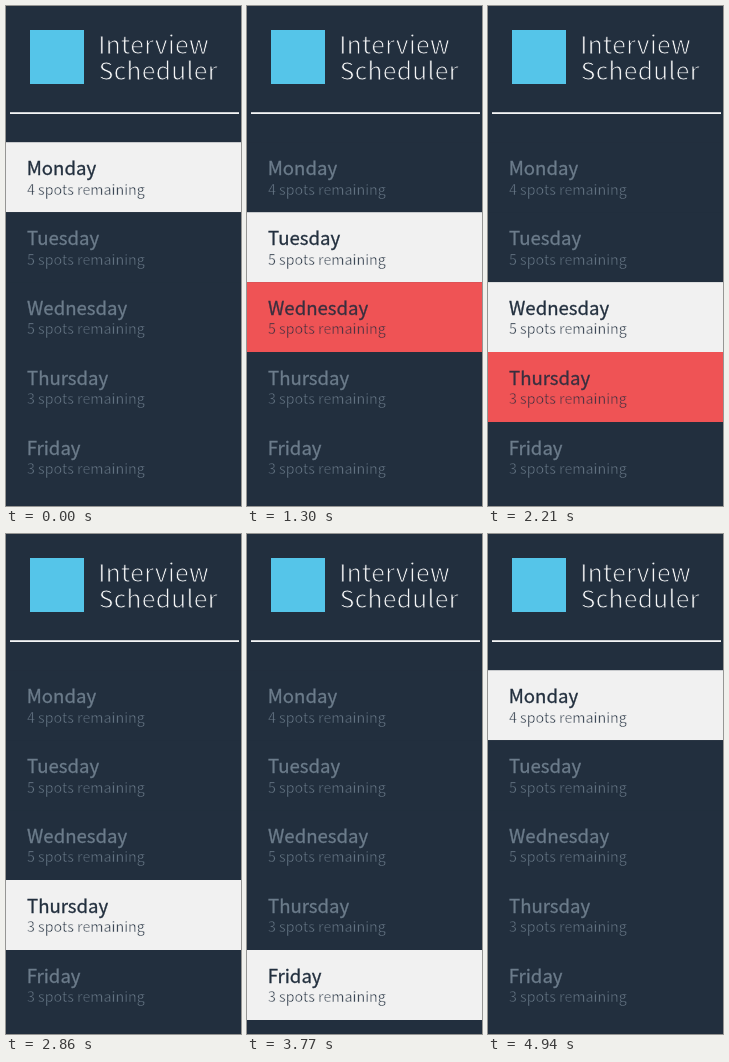
Animation, 235 px wide and 500 px high, one loop 6630 ms. Source, as an HTML page:

```html
<!DOCTYPE html>
<html lang="en">
<head>
<meta charset="utf-8">
<title>Interview Scheduler</title>
<style>
  :root { --ink: #222f3e; --muted: #6c7c8b; --paper: #f1f1f1; --accent: #ef5355; --wine: #382f3f; }
  html, body { margin: 0; width: 100%; height: 100%; overflow: hidden; background: var(--ink); }
  svg { display: block; width: 235px; height: 500px; }
  text { font-family: "Noto Sans CJK SC", "Noto Sans CJK JP", "Noto Sans CJK", "Open Sans", sans-serif; fill: currentColor; }
  .day { color: var(--muted); animation: 6630ms step-end infinite; }
  .day rect { fill: var(--row); }

  /* A stroke in the backdrop colour thins the letters; one in the text colour thickens them. */
  .brand { color: #f4f5f6; font-size: 24.5px; letter-spacing: .35px; stroke: var(--ink); stroke-width: .8px; }
  .name { font-size: 18.6px; stroke: currentColor; stroke-width: .3px; }
  .spots { font-size: 14.25px; stroke: var(--row); stroke-width: .45px; }

  /* The loop is 51 ticks of 130 ms. */
  @keyframes monday {
    0%       { --row: var(--paper); color: var(--ink); }
    15.6863% { --row: var(--ink); color: var(--muted); }
    70.5882% { --row: var(--accent); color: var(--wine); }
    74.5098%, 100% { --row: var(--paper); color: var(--ink); }
  }
  @keyframes tuesday {
    0%       { --row: var(--ink); color: var(--muted); }
    9.8039%  { --row: var(--accent); color: var(--wine); }
    15.6863% { --row: var(--paper); color: var(--ink); }
    29.4118%, 100% { --row: var(--ink); color: var(--muted); }
  }
  @keyframes wednesday {
    0%       { --row: var(--ink); color: var(--muted); }
    19.6078% { --row: var(--accent); color: var(--wine); }
    29.4118% { --row: var(--paper); color: var(--ink); }
    43.1373%, 100% { --row: var(--ink); color: var(--muted); }
  }
  @keyframes thursday {
    0%       { --row: var(--ink); color: var(--muted); }
    33.3333% { --row: var(--accent); color: var(--wine); }
    43.1373% { --row: var(--paper); color: var(--ink); }
    56.8627%, 100% { --row: var(--ink); color: var(--muted); }
  }
  @keyframes friday {
    0%       { --row: var(--ink); color: var(--muted); }
    49.0196% { --row: var(--accent); color: var(--wine); }
    56.8627% { --row: var(--paper); color: var(--ink); }
    74.5098%, 100% { --row: var(--ink); color: var(--muted); }
  }
</style>
</head>
<body>
<svg viewBox="0 0 235 500">
  <rect x="24" y="24" width="54" height="54" fill="#55c5e9"/>
  <g class="brand">
    <text x="92.3" y="48">Interview</text>
    <text x="92.8" y="74">Scheduler</text>
  </g>
  <rect x="4" y="106.2" width="229" height="1.8" fill="#f4f5f6"/>

  <g class="day" style="animation-name: monday" transform="translate(0 136.2)">
    <rect width="235" height="70"/>
    <text class="name" x="20.7" y="32.6">Monday</text>
    <text class="spots" x="21" y="52.4">4 spots remaining</text>
  </g>
  <g class="day" style="animation-name: tuesday" transform="translate(0 206.2)">
    <rect width="235" height="70"/>
    <text class="name" x="21" y="32.6">Tuesday</text>
    <text class="spots" x="21" y="52.4">5 spots remaining</text>
  </g>
  <g class="day" style="animation-name: wednesday" transform="translate(0 276.1)">
    <rect width="235" height="70"/>
    <text class="name" x="21" y="32.6">Wednesday</text>
    <text class="spots" x="21" y="52.4">5 spots remaining</text>
  </g>
  <g class="day" style="animation-name: thursday" transform="translate(0 346)">
    <rect width="235" height="70"/>
    <text class="name" x="21" y="32.6">Thursday</text>
    <text class="spots" x="21" y="52.4">3 spots remaining</text>
  </g>
  <g class="day" style="animation-name: friday" transform="translate(0 416)">
    <rect width="235" height="70"/>
    <text class="name" x="20.7" y="32.6">Friday</text>
    <text class="spots" x="21" y="52.4">3 spots remaining</text>
  </g>
</svg>
</body>
</html>
```
